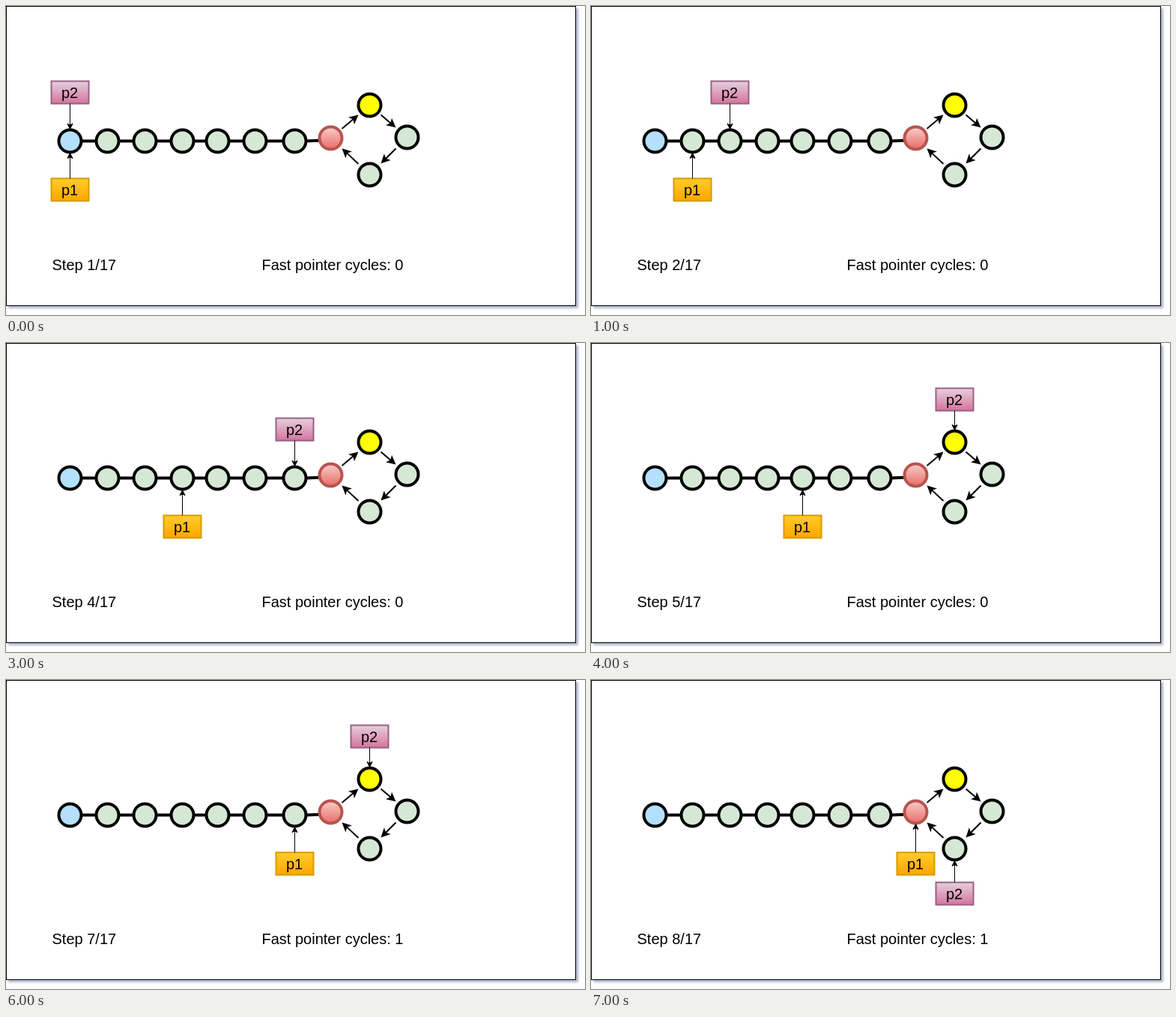
An HTML page that plays this animation: 773x413 px, repeating every 8 s.

```html
<!DOCTYPE html>
<html lang="en">
<head>
<meta charset="utf-8">
<title>Fast and slow pointers</title>
<style>
  html, body { margin: 0; width: 100%; height: 100%; overflow: hidden; background: #fff; }
  svg { display: block; }
  text { font: 20px "Liberation Sans", Arial, sans-serif; }
  .sheet { fill: #fff; stroke: #000; filter: drop-shadow(3px 3px 1.7px rgba(61, 69, 116, .4)); }
</style>
</head>
<body>
<svg width="773" height="413" viewBox="0 0 773 413">
  <defs>
    <linearGradient id="orange" x2="0" y2="1"><stop stop-color="#ffcd28"/><stop offset="1" stop-color="#ffa500"/></linearGradient>
    <linearGradient id="pink" x2="0" y2="1"><stop stop-color="#e6d0de"/><stop offset="1" stop-color="#d5739d"/></linearGradient>
    <linearGradient id="red" x2="0" y2="1"><stop stop-color="#f8cecc"/><stop offset="1" stop-color="#ea6b66"/></linearGradient>
  </defs>
  <rect class="sheet" x=".5" y=".5" width="760" height="400"/>
  <g id="list"></g>
  <g id="pointers"></g>
  <text id="step" x="61.5" y="353"></text>
  <text id="cycles" x="341.5" y="353"></text>
</svg>
<script>
const STEP_MS = 1000, STEPS = 8, RADIUS = 15;
const CYCLE_START = 7, CYCLE_LENGTH = 4, YELLOW = 8, BOTTOM = 10;
const nodes = [
  ...[85.5, 135.5, 185.5, 235.5, 282.5, 332.5, 385.5].map(x => [x, 180.5]),
  [433.5, 176.5], [485.5, 132.5], [535.5, 175.5], [485.5, 225.5]
];
const byId = id => document.getElementById(id);

function arrow(x1, y1, x2, y2, width) {
  const length = Math.hypot(x2 - x1, y2 - y1);
  const ux = (x2 - x1) / length, uy = (y2 - y1) / length;
  const head = 6 + width;
  // Point measured back from the tip and sideways from the shaft
  const at = (back, side) => {
    const d = back + width * 1.118;
    return `${x2 - ux * d - uy * side} ${y2 - uy * d + ux * side}`;
  };
  return `<path stroke="#000" stroke-width="${width}" d="M${x1} ${y1}L${at(head * .75, 0)}
    M${at(0, 0)}L${at(head, head / 2)}L${at(head * .75, 0)}L${at(head, -head / 2)}Z"/>`;
}

function drawNode([x, y], i) {
  const fill = { 0: "#b3e0ff", [CYCLE_START]: "url(#red)", [YELLOW]: "#ff0" }[i] || "#d5e8d4";
  const stroke = i === CYCLE_START ? "#b85450" : "#000";
  return `<circle cx="${x}" cy="${y}" r="${RADIUS}" fill="${fill}" stroke="${stroke}" stroke-width="4"/>`;
}

function drawPointer(label, node, top, fill, stroke) {
  const [x, y] = nodes[node];
  const above = top < y;
  return `<rect x="${x - 25}" y="${top}" width="50" height="30" fill="${fill}" stroke="${stroke}" stroke-width="2"/>
    <text x="${x - .5}" y="${top + 22.5}" text-anchor="middle">${label}</text>` +
    arrow(x, above ? top + 30 : top, x, above ? y - RADIUS : y + RADIUS, 1);
}

byId("list").innerHTML =
  `<path d="M85.5 180.5H400.5L418.5 179.7" fill="none" stroke="#000" stroke-width="4"/>` +
  arrow(448.5, 164, 470.5, 145.5, 2) +
  arrow(500.5, 145.5, 520.5, 162.5, 2) +
  arrow(520.5, 190.5, 500.5, 210.5, 2) +
  arrow(470.5, 211, 448.5, 190.5, 2) +
  nodes.map(drawNode).join("");

const wrap = i => i < CYCLE_START ? i : CYCLE_START + (i - CYCLE_START) % CYCLE_LENGTH;

let shown = -1;
function frame() {
  const step = Math.floor(performance.now() / STEP_MS) % STEPS;
  if (step !== shown) {
    shown = step;
    const slow = wrap(step), fast = wrap(step * 2);
    const fastTop = { [YELLOW]: 60.5, [BOTTOM]: 270.5 }[fast] || 100.5;
    byId("pointers").innerHTML =
      drawPointer("p1", slow, 230.5, "url(#orange)", "#d79b00") +
      drawPointer("p2", fast, fastTop, "url(#pink)", "#996185");
    const cycles = Math.max(0, Math.floor((step * 2 - CYCLE_START) / CYCLE_LENGTH));
    byId("step").textContent = `Step ${step + 1}/17`;
    byId("cycles").textContent = `Fast pointer cycles: ${cycles}`;
  }
  requestAnimationFrame(frame);
}
frame();
</script>
</body>
</html>
```
